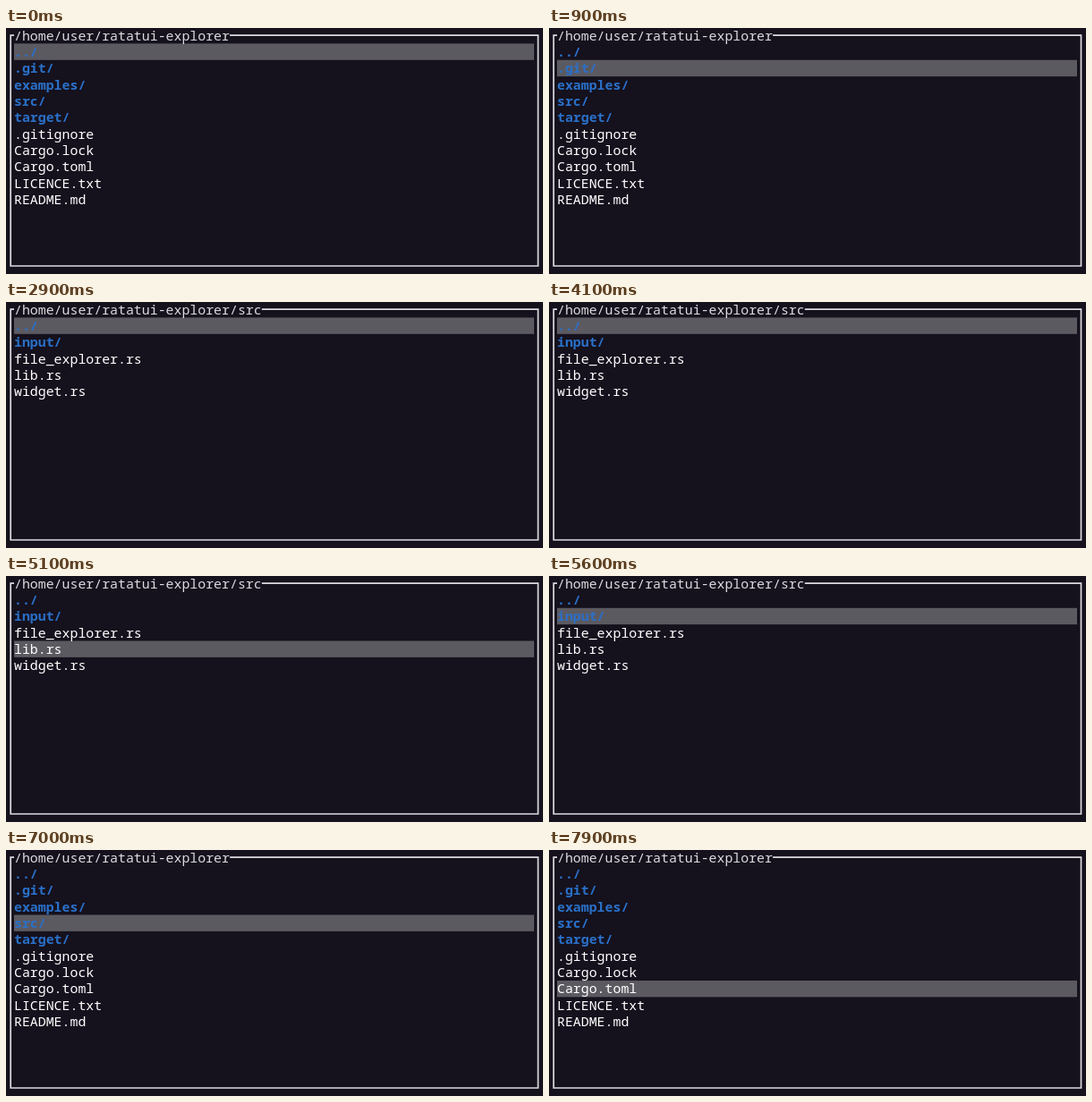
These frames come from a looping animation (600 px wide and 275 px high, 8000 ms). An HTML page with a canvas:

```html
<!DOCTYPE html>
<html lang="en">
<head>
<meta charset="utf-8">
<title>File explorer</title>
<style>
  html, body { margin: 0; width: 100%; height: 100%; overflow: hidden; background: #15111d; }
  canvas { display: block; }
</style>
</head>
<body>
<canvas id="stage" width="600" height="275"></canvas>
<script>
const ctx = document.getElementById('stage').getContext('2d');
const LOOP = 8000;
const CELL = 8.93, ROW = 18.37, LEFT = 9, TOP = 17.4, BASELINE = 14.5;

const root = {
  path: '/home/user/ratatui-explorer',
  items: ['../', '.git/', 'examples/', 'src/', 'target/', '.gitignore',
          'Cargo.lock', 'Cargo.toml', 'LICENCE.txt', 'README.md'],
};
const src = {
  path: root.path + '/src',
  items: ['../', 'input/', 'file_explorer.rs', 'lib.rs', 'widget.rs'],
};

// Each step: start time in ms, directory shown, selected row.
const steps = [
  [0, root, 0], [700, root, 1], [1000, root, 2], [1400, root, 3],
  [2300, src, 0], [3100, src, 1], [4100, src, 0], [4500, src, 1],
  [4800, src, 2], [5100, src, 3], [5400, src, 2], [5600, src, 1], [5800, src, 0],
  [5900, root, 0], [6500, root, 1], [6600, root, 2], [7000, root, 3],
  [7200, root, 4], [7500, root, 5], [7700, root, 6], [7800, root, 7],
];

function text(string, row, color, weight) {
  ctx.font = `${weight} ${CELL / 0.6}px "Noto Sans Mono", "DejaVu Sans Mono", monospace`;
  ctx.fillStyle = color;
  ctx.fillText(string, LEFT, TOP + row * ROW + BASELINE);
}

function drawItem(name, row) {
  if (name.endsWith('/')) text(name, row, '#2a70c8', 600);
  else text(name, row, '#fff', 500);
}

function drawBorder(titleEnd) {
  const left = 5.2, top = 8.2, right = 594.5, bottom = 266;
  ctx.strokeStyle = '#dcdbdf';
  ctx.lineWidth = 1.7;
  ctx.beginPath();
  ctx.moveTo(LEFT, top);
  ctx.lineTo(left, top);
  ctx.lineTo(left, bottom);
  ctx.lineTo(right, bottom);
  ctx.lineTo(right, top);
  ctx.lineTo(titleEnd, top);
  ctx.stroke();
}

function draw({ path, items }, selected) {
  ctx.fillStyle = '#15111d';
  ctx.fillRect(0, 0, 600, 275);
  drawBorder(LEFT + path.length * CELL);
  ctx.fillStyle = '#5c5a61';
  ctx.fillRect(LEFT, TOP + selected * ROW, 581, ROW);
  text(path, -1, '#dcdbdf', 400);
  items.forEach(drawItem);
}

function frame() {
  const time = performance.now() % LOOP;
  const [, directory, selected] = steps.findLast(([start]) => start <= time);
  draw(directory, selected);
  requestAnimationFrame(frame);
}
frame();
</script>
</body>
</html>
```
